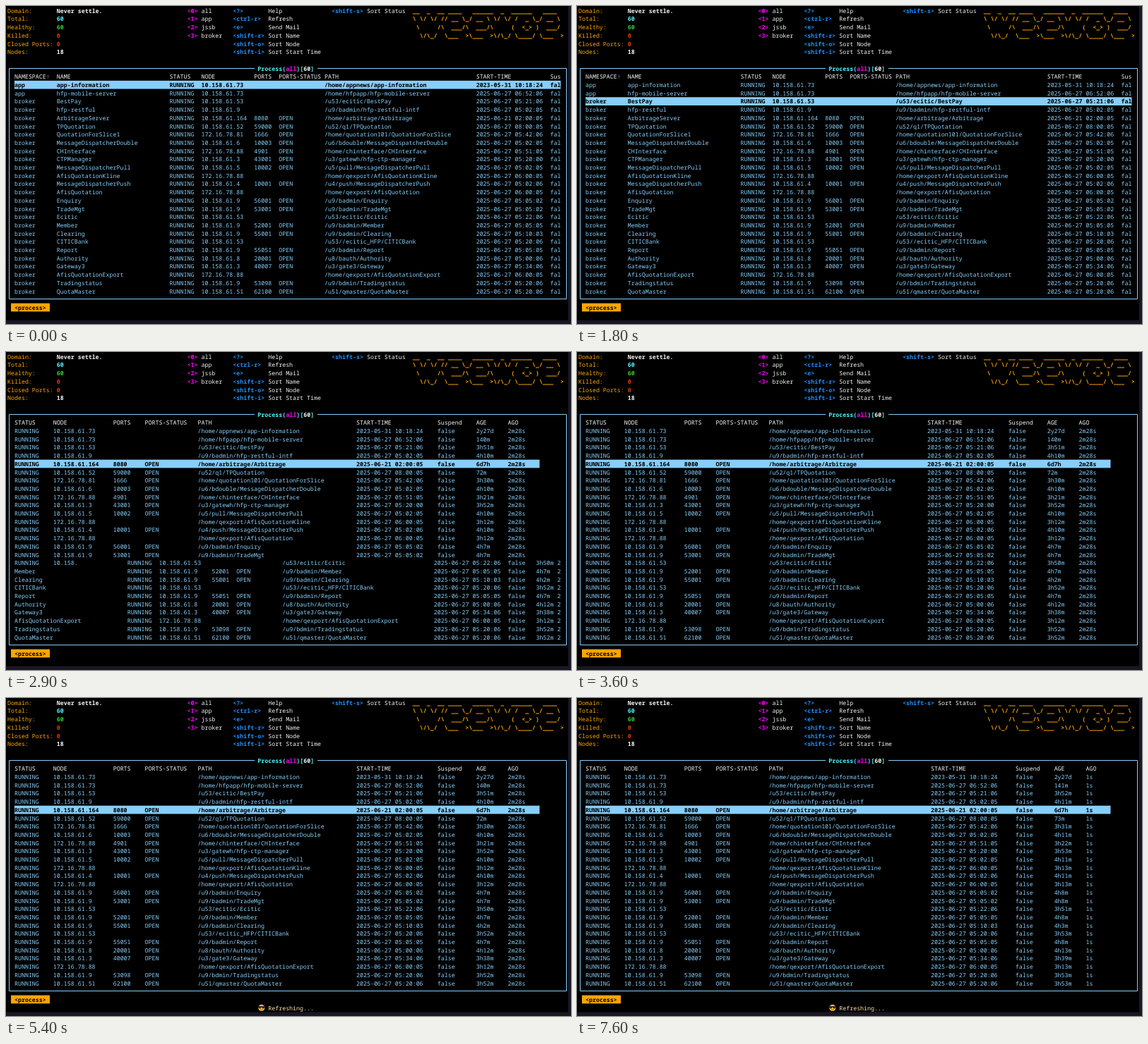
Recreate the animation shown at these times as an HTML page. Size 800 by 451 pixels, loop 8000 ms.

```html
<!DOCTYPE html>
<html lang="en">
<head>
<meta charset="utf-8">
<title>Process monitor</title>
<style>
  html, body { margin: 0; width: 100%; height: 100%; overflow: hidden; background: #000; }
  svg { display: block; width: 100vw; height: 100vh; }
  text {
    font: 8.317px "Noto Sans Mono", monospace;
    white-space: pre;
    text-rendering: geometricPrecision;
  }
  .bold { font-weight: 700; }
</style>
</head>
<body>
<svg viewBox="0 0 800 451">
  <rect width="800" height="451"/>
  <path d="M0 445.5H796V0H800V451H0Z" fill="#191724"/>
  <path d="M352 88.5H4.5V415.5H793.5V88.5H441" fill="none" stroke="#87cefa"/>
  <rect x="7" y="421.6" width="55" height="11.7" fill="#ffa500"/>
  <g id="chrome"></g>
  <g id="table"></g>
  <g id="notice">
    <circle cx="361.8" cy="439.4" r="4.6" fill="#f6bd38"/>
    <path d="M357 437h9.6v1.4q-.5 2.2-2.4 2.1-1.7 0-2.2-2.1h-.4q-.5 2.1-2.2 2.1-1.9.1-2.4-2.1z" fill="#2b2a2c"/>
    <path d="M359.7 441.7q2.1 1.5 4.2 0" fill="none" stroke="#6b431d" stroke-width=".7"/>
  </g>
</svg>
<script>
const CELL_W = 4.99, CELL_H = 11.7, LOOP = 8000, LAST_COL = 157;
const SKY = '#87cefa', ORANGE = '#ffa500', MAGENTA = '#ff00ff', BLUE = '#1e90ff',
      CYAN = '#4df3ff', WHITE = '#f4f4f4';
const chrome = document.getElementById('chrome');
const table = document.getElementById('table');
const notice = document.getElementById('notice');
const colX = col => 2 + col * CELL_W;
const rowY = row => 0.6 + row * CELL_H;

function add(parent, tag, attrs) {
  const el = document.createElementNS('http://www.w3.org/2000/svg', tag);
  for (const key in attrs) el.setAttribute(key, attrs[key]);
  return parent.appendChild(el);
}

function put(parent, col, row, string, fill, bold) {
  const el = add(parent, 'text', { x: colX(col), y: rowY(row) + 9.1, fill });
  if (bold) el.setAttribute('class', 'bold');
  el.textContent = string;
}

// namespace | name | node | port | path | start | age
const rows = `
app|app-information|10.158.61.73||/home/appnews/app-information|2023-05-31 10:18:24|2y27d
app|hfp-mobile-server|10.158.61.73||/home/hfpapp/hfp-mobile-server|2025-06-27 06:52:06|140m
broker|BestPay|10.158.61.53||/u53/ecitic/BestPay|2025-06-27 05:21:06|3h51m
broker|hfp-restful|10.158.61.9||/u9/badmin/hfp-restful-intf|2025-06-27 05:02:05|4h10m
broker|ArbitrageServer|10.158.61.164|8080|/home/arbitrage/Arbitrage|2025-06-21 02:00:05|6d7h
broker|TPQuotation|10.158.61.52|59000|/u52/q1/TPQuotation|2025-06-27 08:00:05|72m
broker|QuotationForSlice1|172.16.78.81|1666|/home/quotation101/QuotationForSlice|2025-06-27 05:42:06|3h30m
broker|MessageDispatcherDouble|10.158.61.6|10003|/u6/bdouble/MessageDispatcherDouble|2025-06-27 05:02:05|4h10m
broker|CHInterface|172.16.78.88|4901|/home/chinterface/CHInterface|2025-06-27 05:51:05|3h21m
broker|CTPManager|10.158.61.3|43001|/u3/gatewh/hfp-ctp-manager|2025-06-27 05:20:00|3h52m
broker|MessageDispatcherPull|10.158.61.5|10002|/u5/pull/MessageDispatcherPull|2025-06-27 05:02:05|4h10m
broker|AfisQuotationKline|172.16.78.88||/home/qexport/AfisQuotationKline|2025-06-27 06:00:05|3h12m
broker|MessageDispatcherPush|10.158.61.4|10001|/u4/push/MessageDispatcherPush|2025-06-27 05:02:06|4h10m
broker|AfisQuotation|172.16.78.88||/home/qexport/AfisQuotation|2025-06-27 06:00:05|3h12m
broker|Enquiry|10.158.61.9|56001|/u9/badmin/Enquiry|2025-06-27 05:05:02|4h7m
broker|TradeMgt|10.158.61.9|53001|/u9/badmin/TradeMgt|2025-06-27 05:05:02|4h7m
broker|Ecitic|10.158.61.53||/u53/ecitic/Ecitic|2025-06-27 05:22:06|3h50m
broker|Member|10.158.61.9|52001|/u9/badmin/Member|2025-06-27 05:05:05|4h7m
broker|Clearing|10.158.61.9|55001|/u9/badmin/Clearing|2025-06-27 05:10:03|4h2m
broker|CITICBank|10.158.61.53||/u53//ecitic_HFP/CITICBank|2025-06-27 05:20:06|3h52m
broker|Report|10.158.61.9|55051|/u9/badmin/Report|2025-06-27 05:05:05|4h7m
broker|Authority|10.158.61.8|20001|/u8/bauth/Authority|2025-06-27 05:00:06|4h12m
broker|Gateway3|10.158.61.3|40007|/u3/gate3/Gateway|2025-06-27 05:34:06|3h38m
broker|AfisQuotationExport|172.16.78.88||/home/qexport/AfisQuotationExport|2025-06-27 06:00:05|3h12m
broker|Tradingstatus|10.158.61.9|53098|/u9/bdmin/Tradingstatus|2025-06-27 05:20:06|3h52m
broker|QuotaMaster|10.158.61.51|62100|/u51/qmaster/QuotaMaster|2025-06-27 05:20:06|3h52m
`.trim().split('\n').map(line => {
  const [ns, name, node, port, path, start, age] = line.split('|');
  return { ns, name, status: 'RUNNING', node, port, open: port && 'OPEN', path, start, suspend: 'false', age };
});

const titles = {
  ns: 'NAMESPACE', name: 'NAME', status: 'STATUS', node: 'NODE', port: 'PORTS', open: 'PORTS-STATUS',
  path: 'PATH', start: 'START-TIME', suspend: 'Suspend', age: 'AGE', ago: 'AGO'
};
const left = { ns: 2, name: 14, status: 46, node: 55, port: 70, open: 77, path: 90, start: 133, suspend: 154 };
const right = { status: 2, node: 13, port: 30, open: 39, path: 54, start: 99, suspend: 122, age: 133, ago: 142 };
const fresh = { ...right, start: 100, suspend: 124, age: 135, ago: 144 };
const torn = { name: 2, status: 34, node: 43, port: 58, open: 65, path: 78, start: 121, suspend: 142, age: 150, ago: 156 };
const TEAR_ROW = 16;

const steps = [
  { at: 0, layout: left, selected: 0 },
  { at: 1400, layout: left, selected: 1 },
  { at: 1800, layout: left, selected: 2 },
  { at: 2200, layout: left, selected: 3 },
  { at: 2500, layout: left, selected: 4 },
  { at: 2900, layout: right, selected: 4, ago: '2m28s', tear: true },
  { at: 3300, layout: right, selected: 4, ago: '2m28s' },
  { at: 5400, layout: right, selected: 4, ago: '2m28s', notice: true },
  { at: 5800, layout: fresh, selected: 4, ago: '0s', notice: true },
  { at: 6900, layout: fresh, selected: 4, ago: '1s', notice: true }
];

function putCells(layout, row, cells, fill, bold) {
  for (const key in layout) {
    const col = layout[key];
    if (cells[key]) put(table, col, row, cells[key].slice(0, LAST_COL - col), fill, bold);
  }
}

function drawTable({ layout, selected, ago, tear, notice: busy }) {
  table.replaceChildren();
  notice.style.display = busy ? '' : 'none';
  putCells(layout, 8, titles, WHITE);
  if (layout === left) put(table, 11, 8, '↑', SKY);
  add(table, 'rect', {
    x: colX(2), y: rowY(9 + selected), height: CELL_H, fill: SKY,
    width: CELL_W * (layout === left ? 155 : 149)
  });
  rows.forEach((cells, i) => {
    const chosen = i === selected;
    const isTorn = tear && i >= TEAR_ROW;
    const shown = { ...cells, ago };
    if (layout === fresh) shown.age = cells.age.replace(/\d+(?=m$)/, m => +m + 1);
    if (isTorn && i === TEAR_ROW) {
      shown.name = '';
      put(table, 2, 9 + i, 'RUNNING', SKY);
      put(table, 13, 9 + i, '10.158.', SKY);
    }
    putCells(isTorn ? torn : layout, 9 + i, shown, chosen ? '#000' : SKY, chosen);
  });
}

function drawChrome() {
  [['Domain:', 'Never settle.', WHITE], ['Total:', '60', CYAN], ['Healthy:', '60', '#32cd32'],
   ['Killed:', '0', '#e0340a'], ['Closed Ports:', '0', '#e0340a'], ['Nodes:', '18', WHITE]
  ].forEach(([label, value, fill], row) => {
    put(chrome, 0, row, label, ORANGE);
    put(chrome, 14, row, value, fill, true);
  });
  ['all', 'app', 'jssb', 'broker'].forEach((name, row) => {
    put(chrome, 51, row, `<${row}>`, MAGENTA, true);
    put(chrome, 55, row, name, WHITE);
  });
  [['?', 'Help'], ['ctrl-r', 'Refresh'], ['e', 'Send Mail'], ['shift-r', 'Sort Name'],
   ['shift-o', 'Sort Node'], ['shift-i', 'Sort Start Time'], ['shift-s', 'Sort Status']
  ].forEach(([key, action], i) => {
    const col = i < 6 ? 64 : 92, row = i % 6;
    put(chrome, col, row, `<${key}>`, BLUE, true);
    put(chrome, col + 10, row, action, WHITE);
  });
  String.raw`__  _  __ ____   ______  _  ______   ____
\ \/ \/ // __ \_/ __ \ \/ \/ /  _ \_/ __ \
 \     /\  ___/\  ___/\     (  <_> )  ___/
  \/\_/  \___  >\___  >\/\_/ \____/ \___  >`.split('\n')
    .forEach((line, row) => put(chrome, 115, row, line, ORANGE, true));
  put(chrome, 71, 7, 'Process(', CYAN, true);
  put(chrome, 79, 7, 'all', MAGENTA, true);
  put(chrome, 82, 7, ')[', CYAN, true);
  put(chrome, 84, 7, '60', WHITE, true);
  put(chrome, 86, 7, ']', CYAN, true);
  put(chrome, 2, 36, '<process>', '#000', true);
  put(notice, 74, 37, 'Refreshing...', '#ffdead');
}

let current;
const began = performance.now();
function tick() {
  const time = (performance.now() - began) % LOOP;
  const step = steps.findLast(s => s.at <= time);
  if (step !== current) drawTable(current = step);
  requestAnimationFrame(tick);
}

drawChrome();
tick();
</script>
</body>
</html>
```
